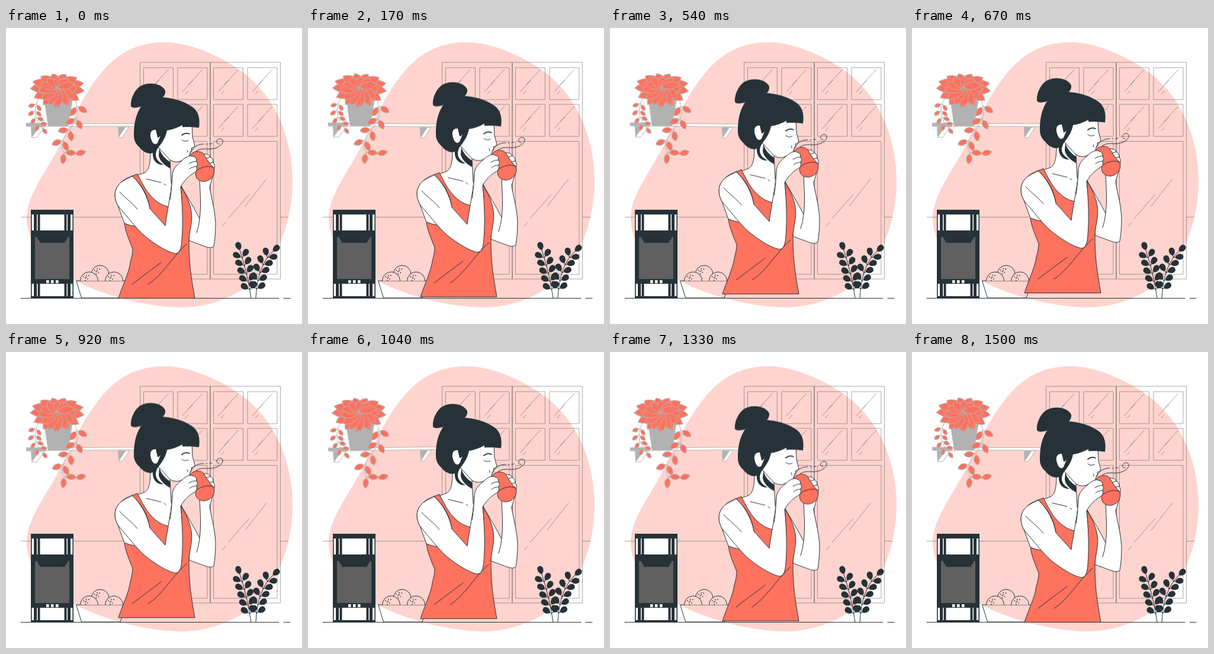
These frames come from a looping animation (500x500 px, 1.54 s). An HTML page:

```html
<!DOCTYPE html>
<html lang="en">
<head>
<meta charset="utf-8">
<title>Morning cup</title>
<style>
  html, body { margin: 0; width: 100%; height: 100%; overflow: hidden; background: #fff; }
  svg { display: block; width: 100vw; height: 100vh; }
  .ln, .skin, .coral { stroke: #263238; stroke-width: 1; stroke-linecap: round; stroke-linejoin: round; }
  .ln { fill: none; }
  .skin { fill: #fff; }
  .coral { fill: #ff725e; }
  .fill { fill: #fff; }
  .dark { fill: #263238; }
  .thin { fill: none; stroke: #263238; stroke-width: .7; opacity: .6; }
  .gray { fill: #b2b2b2; }
  .board { fill: #fff; stroke: #b2b2b2; }
  .petal { fill: #ff725e; stroke: #b2b2b2; }
  .vine { fill: none; stroke: #b2b2b2; }
  .brow { stroke-width: 1.8; }
  #woman { animation: float 1540ms linear infinite; }
  #shelf { transform-origin: 125.5px 152.5px; animation: sway 1540ms linear infinite; }
  /* 1500 ms of movement, then a 40 ms rest */
  @keyframes float {
    0%, 97.4%, 100% { transform: translateY(0); }
    48.7% { transform: translateY(-10px); }
  }
  @keyframes sway {
    0%, 97.4%, 100% { transform: rotate(0deg); }
    24.35% { transform: rotate(1deg); }
    73.05% { transform: rotate(-1deg); }
  }
</style>
</head>
<body>
<svg viewBox="0 0 500 500" preserveAspectRatio="none">
  <path fill="#ffd4ce" d="M268 24C312 24 370 50 408 81C460 124 485 195 484 262C483 325 462 380 426 421C395 452 345 472 295 472C235 471 165 452 115 426C66 399 34 365 35 318C36 280 72 238 96 188C112 156 130 112 164 72C192 40 225 24 268 24Z"/>

  <g id="doors" class="thin">
    <path d="M25 319.5H226.5M463.5 319.5H477M226.5 58H463.5V424H226.5ZM344.5 58V424M345.5 58V424"/>
    <path d="M404 301L440 255M375 322L411 281M365 335L371 328"/>
  </g>
  <path class="ln" d="M25 456.5H461M469 456.5H480"/>
  <g id="oven"></g>
  <g id="bowl">
    <path class="ln" d="M119 427H203L193 456H128Z"/>
  </g>
  <g id="bush"></g>

  <g id="shelf">
    <path class="gray" d="M42 167H56L43 185ZM189 167H202L190 185Z"/>
    <path class="board" d="M56 167H65L52 185H43ZM202 167H208L196 185H190Z"/>
    <path class="board" d="M36 161.5H217V166H36Z"/>
    <path class="gray" d="M34 160.5H68V166.5H34ZM64 118H113L105 166H71Z"/>
  </g>

  <g id="woman">
    <!-- far arm -->
    <path class="skin" d="M296 267C306 285 318 304 327 322C330 300 328 280 327 255L350 226C354 240 348 254 344 268C346 285 353 305 354 330Q354 352 351 369Q346 373 336 369L309 359L311 320Z"/>
    <path class="ln" d="M327 322Q326 335 322 346"/>
    <!-- neck, back and top -->
    <path class="skin" d="M244 207C244 225 243 238 235 244C225 249 205 251 193 262C183 272 182 287 189 300L200 330L240 345L296 300L279 262L277 222L262 200Z"/>
    <path class="coral" d="M213 250L222 246.5C230 262 236 274 244 283C254 294 264 300 275 302L294 266C303 279 311 295 313 310C316 328 309 345 309 360C309 395 312 418 319 456.5H190C196 437 208 413 210 396Q214 382 214 373C208 358 202 345 200 330Q209 334 219 335L243 305C240 282 228 263 213 250Z"/>
    <!-- near arm -->
    <path class="fill" d="M193 262C183 272 182 287 189 300C203 316 219 338 235 352C255 368 276 380 287 381Q294 380 296 368C299 345 299 305 295 268L281 250C279 280 272 310 269 334L243 305C240 286 228 263 213 251Z"/>
    <path class="ln" d="M213 250C204 253 196 258 191 264C182 274 182 287 189 300L192 304C203 316 219 338 235 352C255 368 276 380 287 381Q294 380 296 368C299 345 299 305 295 268M281 250C279 280 272 310 269 334L243 305C240 286 228 263 213 250M192 277C201 287 212 294 222 306M237 255L262 261M267 263L270 266"/>
    <path class="ln" d="M213 433L234 417L262 396M240 433C264 418 278 390 305 365"/>

    <!-- head -->
    <path class="skin" d="M250 165L314 160L315 184Q317 191 319 199Q317 203 313 203L314 207L311 211Q310 220 300 222Q289 230 277 223L258 202Z"/>
    <path class="dark" d="M216 182C216 155 222 130 246 118C270 114 301 122 317 135C326 143 328 155 326 168.500C316 167 306 167 298 167.500V164Q285 171 272 173C270 183 266 190 261 197C252 207 251 216 256 223C259 227 263 229 266 231C254 232 247 222 248 211C242 214 232 210 226 202C218 195 216 188 216 182Z"/>
    <path class="dark" d="M211 132C210 118 219 100 232 96C245 91 264 95 269 106C270 115 263 120 255 120C242 122 237 129 227 133Q214 137 211 132Z"/>
    <path class="dark" d="M259 203C262 214 270 222 277 226L277 237C268 232 260 225 258 216Z"/>
    <path class="fill" d="M253 172C245 171 242 178 245 187C247 195 252 199 256 194L261 182Q258 186 256 185Z"/>
    <path class="ln" d="M297 189Q302 193 308 190M306 206Q308 208 307 210"/>
    <path class="ln brow" d="M297 181Q303 176 310 179"/>

    <!-- cup and hands -->
    <path class="skin" d="M333 213Q343 212 345 218Q350 220 350 227Q354 232 351 240L340 238Z"/>
    <path class="ln" d="M336 221L345 218M340 229L350 227"/>
    <path class="coral" d="M311 215C314 208 329 206 334 213C339 221 344 230 351 236C354 247 348 257 336 259C325 260 318 252 321 242Z"/>
    <path class="ln" d="M321 242C328 235 343 231 351 236"/>
    <path class="fill" d="M281 250C281 238 288 232 296 225C303 218 311 214 316 217Q322 218 322 225Q325 230 322 234Q324 240 319 244C310 249 302 256 295 268L296 285L278 280Z"/>
    <path class="ln" d="M277 290C280 275 280 262 281 250C281 238 288 232 296 225C303 218 311 214 316 217Q322 218 322 225Q325 230 322 234Q324 240 319 244C310 249 302 256 295 268L297 288M322 225Q315 225 309 229M322 234Q315 234 310 238"/>
    <path class="ln" d="M321 208C332 200 343 208 356 202C368 197 369 187 361 187C354 188 354 196 360 196M311 210C317 200 325 196 334 196M338 196H340M344 196L348 195"/>
  </g>
</svg>
<script>
  const NS = 'http://www.w3.org/2000/svg';

  function add(id, cls, d, transform = '') {
    const p = document.createElementNS(NS, 'path');
    p.setAttribute('class', cls);
    p.setAttribute('d', d);
    p.setAttribute('transform', transform);
    return document.getElementById(id).appendChild(p);
  }

  const box = (id, cls, x, y, w, h) => add(id, cls, `M${x} ${y}h${w}v${h}h${-w}Z`);

  // Leaf along an angle; blunt = 1 rounds the tip, lower values sharpen it.
  function leaf(id, cls, x, y, angle, len, w, blunt = .7) {
    const half = w * .7;
    const d = `M0 0C${len * .25} ${-half} ${len * blunt} ${-half} ${len} 0C${len * blunt} ${half} ${len * .25} ${half} 0 0Z`;
    add(id, cls, d, `translate(${x} ${y}) rotate(${angle * 180 / Math.PI})`);
  }

  // Stem with evenly spaced pairs of leaves and one at the tip.
  function sprig(id, stemCls, leafCls, d, { pairs, from, len, w, spread, blunt }) {
    const stem = add(id, stemCls, d);
    const total = stem.getTotalLength();
    for (let i = 0; i <= pairs; i++) {
      const s = total * (from + (1 - from) * i / pairs);
      const p = stem.getPointAtLength(s);
      const q = stem.getPointAtLength(s - 1);
      const dir = Math.atan2(p.y - q.y, p.x - q.x);
      for (const side of i < pairs ? [-1, 1] : [0]) {
        const a = dir + side * spread;
        const gap = side ? 3 : 0;
        if (gap) add(id, stemCls, `M${p.x} ${p.y}l${gap * Math.cos(a)} ${gap * Math.sin(a)}`);
        leaf(id, leafCls, p.x + gap * Math.cos(a), p.y + gap * Math.sin(a), a, len, w, blunt);
      }
    }
  }

  // Window panes with reflections
  for (const x of [232.5, 290, 350.5, 408]) {
    for (const y of [67, 129]) {
      box('doors', '', x, y, 50, 54);
      add('doors', '', `M${x + 18} ${y + 29}l24 -26M${x + 8} ${y + 41}l18 -20M${x + 13} ${y + 45}l5 -6`);
    }
  }
  for (const x of [232.5, 350.5]) box('doors', '', x, 191.5, 107.5, 224.5);

  // Oven, mirrored about x = 78
  box('oven', 'fill', 42, 307, 72, 150);
  box('oven', 'dark', 42, 307, 72, 8);
  for (const side of [-1, 1]) {
    for (const [off, w] of [[35.2, 1.6], [28.5, 5], [22.5, 4]]) {
      box('oven', 'dark', 78 + side * off - w / 2, 315, w, 140);
    }
  }
  box('oven', 'dark', 42, 342, 72, 90);
  box('oven', 'dark', 42, 453, 72, 4);
  add('oven', '', 'M49 353H52L58 363H99L105 353H107V424H49Z').style.fill = '#606060';
  for (const x of [68, 76, 84]) box('oven', 'fill', x, 426, 4.5, 5);

  // Oranges
  for (const [x, y] of [[159, 416], [140.5, 427], [182.5, 427]]) {
    const fruit = add('bowl', 'ln', `M${x - 15} 427V${y}a15 15 0 0 1 30 0V427`);
    fruit.style.fill = '#ffd4ce';
    for (let i = 0; i < 7; i++) {
      const a = i * 2.4, r = 2.3 * Math.sqrt(i);
      add('bowl', 'dark', `M${x - 5 + r * Math.cos(a)} ${y - 7 + r * Math.sin(a)}a.9 .9 0 1 1 0 1.8a.9 .9 0 1 1 0 -1.8`);
    }
  }

  const bush = { pairs: 5, from: .17, len: 14, w: 9.5, spread: .85, blunt: 1 };
  sprig('bush', 'ln', 'dark', 'M414 456Q408 415 395 375', bush);
  sprig('bush', 'ln', 'dark', 'M422 456Q425 400 451 377', bush);

  sprig('shelf', 'vine', 'petal', 'M56 118C42 142 52 158 62 170',
    { pairs: 4, from: .2, len: 11, w: 6, spread: .9 });
  sprig('shelf', 'vine', 'petal', 'M115 118C130 150 112 164 103 178C88 196 92 220 118 213',
    { pairs: 5, from: .12, len: 17, w: 9, spread: .8 });

  // Crown: wide back ring, then a shorter hanging front ring
  function ring(n, first, step, rx, up, down, w) {
    for (let i = 0; i < n; i++) {
      const a = first + i * step;
      const dx = rx * Math.cos(a);
      const dy = (Math.sin(a) < 0 ? up : down) * Math.sin(a);
      leaf('shelf', 'petal', 87, 100, Math.atan2(dy, dx), Math.hypot(dx, dy), w);
    }
  }
  ring(13, -.3, Math.PI * 2 / 13, 46, 23, 35, 17);
  ring(7, .1, .48, 33, 18, 34, 15);
  ring(5, Math.PI + .3, .64, 30, 18, 0, 12);
</script>
</body>
</html>
```
